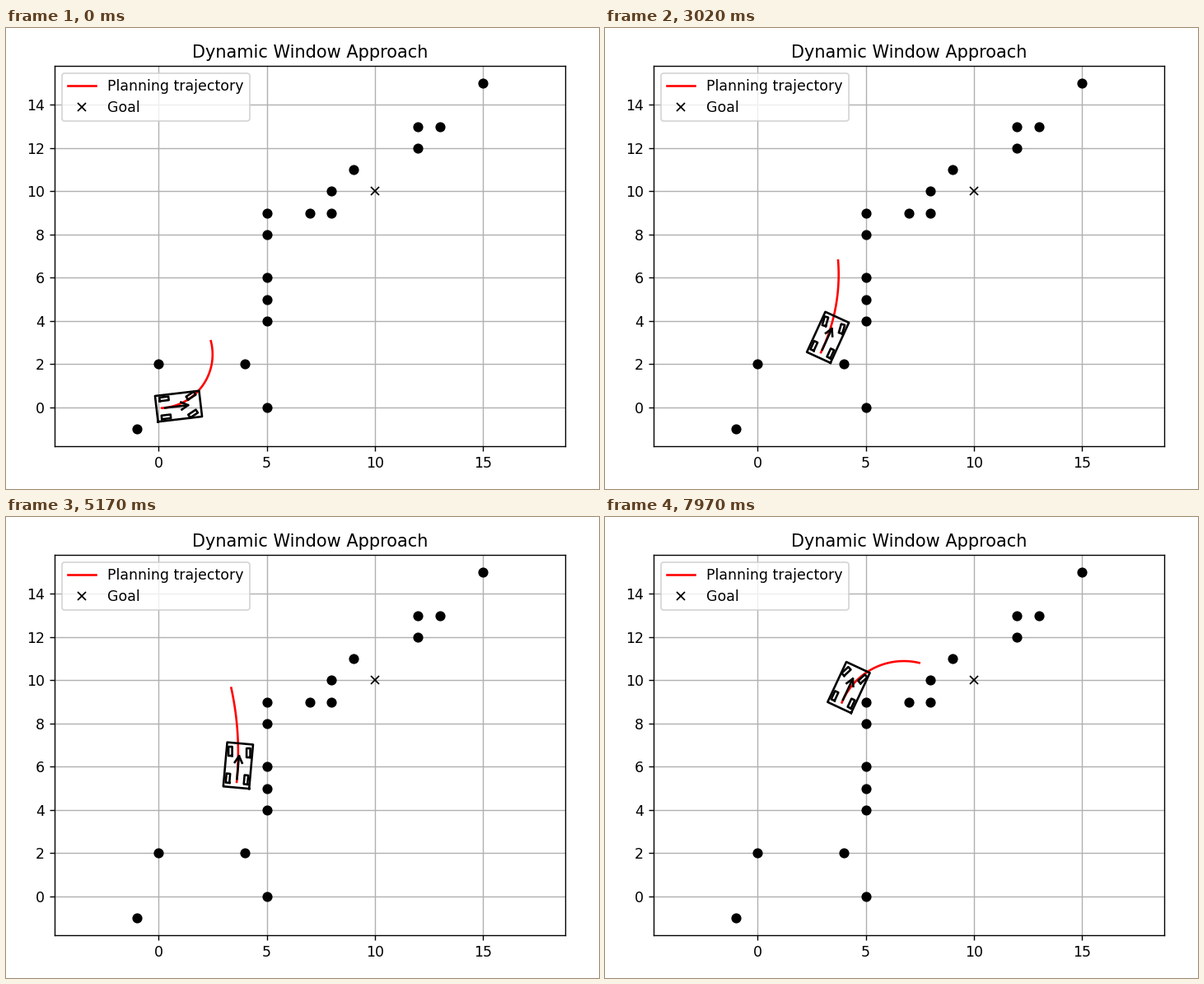
Animation of 720x560 px, one loop 8000 ms. Source, as a matplotlib script:

```python
import numpy as np
import matplotlib.pyplot as plt
from matplotlib.animation import FuncAnimation

plt.rcParams["font.family"] = "DejaVu Sans"

LOOP_MS, INTERVAL = 8000, 25
W, H, DPI = 720, 560, 125
AX_LEFT, AX_BOTTOM, AX_W, AX_H = 59, 52, 620, 462

OBSTACLES = [(-1, -1), (0, 2), (4, 2), (5, 0), (5, 4), (5, 5), (5, 6), (5, 8),
             (5, 9), (7, 9), (8, 9), (8, 10), (9, 11), (12, 12), (12, 13),
             (13, 13), (15, 15)]

# The vehicle advances one constant-length step per simulation tick
STEP_MS = 106.5
STEP_LENGTH = 0.1425
START = np.array([0.303, -0.025])
PLAN_LENGTH = 4.38
PLAN_STEPS = PLAN_LENGTH / STEP_LENGTH

# Steering key points: step, heading and turn of the planned arc in degrees
STEERING = np.array([(0, 6.7, 101), (12, 47.5, 47), (16, 55.4, 25),
                     (28, 65.4, 30), (41, 81.9, 16), (55, 87.9, 20),
                     (63, 90, 0), (66, 90, 0), (68, 84, -87), (74, 65, -81)])
steps = np.arange(int(LOOP_MS / STEP_MS) + 1)
heading, plan_turn = (np.radians(np.interp(steps, STEERING[:, 0], column))
                      for column in STEERING[:, 1:].T)


def direction(angle):
    return np.stack([np.cos(angle), np.sin(angle)], axis=-1)


moves = STEP_LENGTH * direction((heading[1:] + heading[:-1]) / 2)
position = START + np.vstack([np.zeros(2), np.cumsum(moves, axis=0)])

# Vehicle geometry, origin at the rear axle
REAR, FRONT, HALF_WIDTH = -0.4, 1.65, 0.6
WHEEL_BASE, HALF_TREAD = 1.25, 0.42
TIRE_LENGTH, TIRE_WIDTH = 0.42, 0.17
ARROW_TIP, BARB_BACK, BARB_SIDE = 1.07, 0.31, 0.17


def rectangle(x0, x1, half_width):
    return np.array([(x0, -half_width), (x1, -half_width), (x1, half_width),
                     (x0, half_width), (x0, -half_width)])


def rotate(points, angle):
    c, s = np.cos(angle), np.sin(angle)
    return points @ np.array([(c, s), (-s, c)])


BODY = rectangle(REAR, FRONT, HALF_WIDTH)
TIRE = rectangle(-TIRE_LENGTH / 2, TIRE_LENGTH / 2, TIRE_WIDTH / 2)
SHAFT = np.array([(0, 0), (ARROW_TIP, 0)])
HEAD = np.array([(ARROW_TIP - BARB_BACK, BARB_SIDE), (ARROW_TIP, 0),
                 (ARROW_TIP - BARB_BACK, -BARB_SIDE)])


def vehicle_parts(steer):
    tires = [rotate(TIRE, angle) + (x, side * HALF_TREAD)
             for x, angle in ((0, 0), (WHEEL_BASE, steer)) for side in (1, -1)]
    return [BODY, *tires, SHAFT, HEAD]


def planned_arc(step):
    """Constant-curvature path starting one step behind the vehicle."""
    turn = plan_turn[step]
    start_heading = heading[step] - turn / PLAN_STEPS
    start = position[step] - STEP_LENGTH * direction(start_heading)
    s = np.linspace(0, 1, 61)
    half_turn = turn * s / 2
    chord = PLAN_LENGTH * s * np.sinc(half_turn / np.pi)
    return start + chord[:, None] * direction(start_heading + half_turn)


fig = plt.figure(figsize=(W / DPI, H / DPI), dpi=DPI, facecolor="white")
ax = fig.add_axes([AX_LEFT / W, AX_BOTTOM / H, AX_W / W, AX_H / H])
half_height = 8.8
half_span = half_height * AX_W / AX_H
ax.set_xlim(7 - half_span, 7 + half_span)
ax.set_ylim(7 - half_height, 7 + half_height)
ax.set_xticks(range(0, 16, 5))
ax.set_yticks(range(0, 15, 2))
ax.grid(True)
ax.set_title("Dynamic Window Approach")

ax.plot(*zip(*OBSTACLES), "ok")
plan_line, = ax.plot([], [], "-r", label="Planning trajectory")
ax.plot(10, 10, "xk", label="Goal")
part_lines = [ax.plot([], [], "-k")[0] for _ in vehicle_parts(0)]
ax.legend(loc="upper left")


def draw(frame):
    step = int((frame * INTERVAL + 20) / STEP_MS)
    plan_line.set_data(*planned_arc(step).T)
    steer = np.arctan(WHEEL_BASE * plan_turn[step] / PLAN_LENGTH)
    for line, part in zip(part_lines, vehicle_parts(steer)):
        line.set_data(*(rotate(part, heading[step]) + position[step]).T)
    return [plan_line, *part_lines]


anim = FuncAnimation(fig, draw, frames=LOOP_MS // INTERVAL, interval=INTERVAL,
                     repeat=True, repeat_delay=0, blit=False)
plt.show()
```
